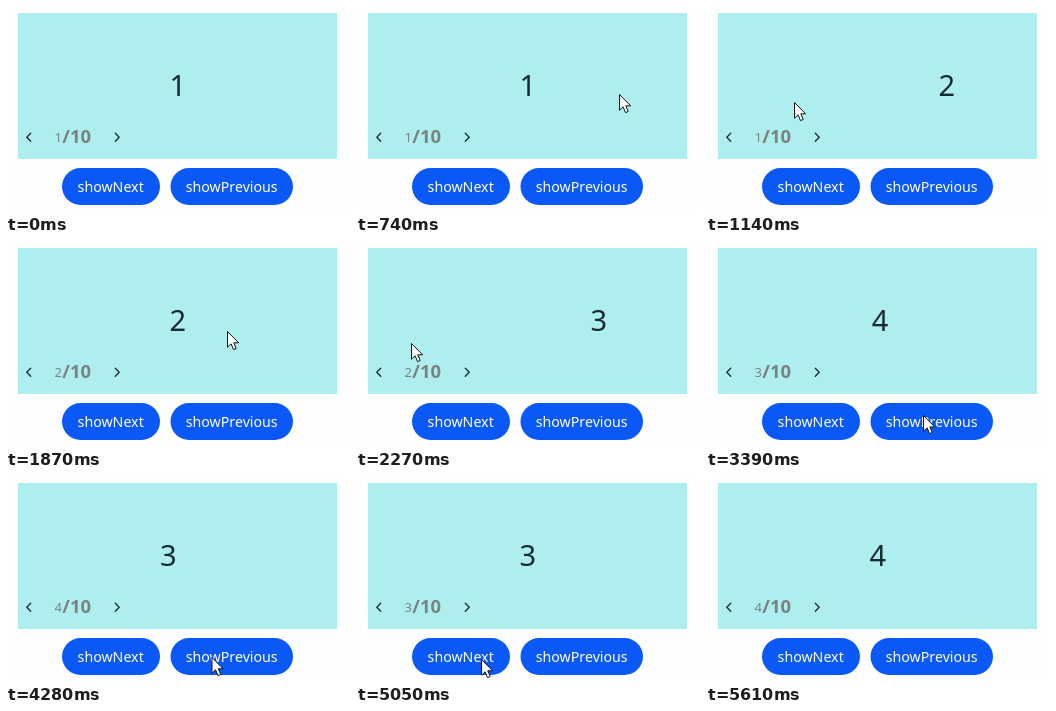
An HTML page for the animation above (6.11 s loop, 344 by 207 pixels).

```html
<!DOCTYPE html>
<html lang="en">
<head>
<meta charset="utf-8">
<title>Swiper</title>
<style>
  html, body { margin: 0; width: 100%; height: 100%; overflow: hidden; background: #fefefe; }
  svg { display: block; width: 100vw; height: 100vh; font-family: "Noto Sans", sans-serif; }
  .slide { font-size: 29px; fill: #182a30; text-anchor: middle; }
  .index { font-size: 13px; font-weight: 300; fill: #7a8585; text-anchor: middle; }
  .total { font-size: 18.5px; font-weight: 700; fill: #7b8282; }
  .arrow { fill: none; stroke: #182a30; stroke-width: 1.3; stroke-linecap: round; stroke-linejoin: round; }
  .button rect { fill: #0a59f7; }
  .button text { font-size: 14.2px; font-weight: 500; fill: #fff; text-anchor: middle; }
</style>
</head>
<body>
<svg viewBox="0 0 344 207">
  <defs><clipPath id="panel"><rect x="12" y="7" width="319" height="146"/></clipPath></defs>
  <rect x="12" y="7" width="319" height="146" fill="#afeeee"/>
  <g clip-path="url(#panel)">
    <text class="slide" id="left" y="90"></text>
    <text class="slide" id="right" y="90"></text>
  </g>
  <path class="arrow" d="M24.7 127.2L20.8 131.2L24.7 135.2M109.3 127.2L113.2 131.2L109.3 135.2"/>
  <text class="index" id="index" x="52.2" y="136"></text>
  <text class="total" x="56.3" y="137">/10</text>
  <g class="button">
    <rect x="56" y="162" width="98" height="37" rx="18.5"/>
    <text x="104.7" y="185.8">showNext</text>
  </g>
  <g class="button">
    <rect x="164.5" y="162" width="122.5" height="37" rx="18.5"/>
    <text x="225.7" y="185.8">showPrevious</text>
  </g>
  <path id="cursor" d="M.5 .5V16.2L4.1 12.8L6.5 18.6L9.2 17.5L6.8 11.8H11.6Z"
    fill="#fff" stroke="#111" stroke-width="1" stroke-linejoin="round"/>
</svg>
<script>
const LOOP = 6110, WIDTH = 319, CENTER = 171.7;
const DRAG = 260, PULL = 116, FLICK = 1000;

// at: spring start, mark: when the page counter follows
const moves = [
  { at: 1038, mark: 1460, from: 1, to: 2, drag: true },
  { at: 2170, mark: 2580, from: 2, to: 3, drag: true },
  { at: 3100, mark: 3540, from: 3, to: 4, drag: true },
  { at: 4017, mark: 4590, from: 4, to: 3 },
  { at: 5053, mark: 5600, from: 3, to: 4 }
];

const ease = {
  in: u => u * u,
  out: u => 1 - (1 - u) * (1 - u),
  both: u => u * u * (3 - 2 * u)
};

// time, x, y, easing towards this point
const path = [
  [250, 165, 140],
  [450, 263, 88, "out"],
  [778, 263, 88, "both"],
  [1038, 142, 94, "in"],
  [1130, 88, 96, "out"],
  [1320, 88, 96, "both"],
  [1530, 228, 89, "both"],
  [1620, 221, 90, "both"],
  [1910, 221, 90, "both"],
  [2170, 100, 99, "in"],
  [2260, 55, 102, "out"],
  [2340, 55, 102, "both"],
  [2590, 292, 90, "both"],
  [2840, 292, 90, "both"],
  [3100, 171, 98, "in"],
  [3180, 130, 102, "out"],
  [3390, 217, 174, "out"],
  [3610, 225, 183, "out"],
  [4160, 225, 183, "both"],
  [4280, 206, 181, "in"],
  [4600, 125, 183, "out"],
  [5050, 125, 183, "both"],
  [5270, 118, 210, "in"]
];

const el = id => document.getElementById(id);
const left = el("left"), right = el("right"), index = el("index"), cursor = el("cursor");

// Damped spring: stiffness 328, damping 34, mass 1
function spring(ms, dist, speed) {
  const s = ms / 1000, k = 17, w = Math.sqrt(328 - k * k);
  return Math.exp(-k * s) * (dist * Math.cos(w * s) + (k * dist - speed) / w * Math.sin(w * s));
}

function travel(m, t) {
  const s = t - m.at;
  if (s >= 0) {
    if (s > 520) return WIDTH;
    return WIDTH - (m.drag ? spring(s, WIDTH - PULL, FLICK) : spring(s, WIDTH, 0));
  }
  return m.drag && s > -DRAG ? PULL * ease.in(1 + s / DRAG) : 0;
}

function position(t) {
  let p = 1;
  for (const m of moves) p += (m.to - m.from) * travel(m, t) / WIDTH;
  return p;
}

function place(node, n, p) {
  node.textContent = n;
  node.setAttribute("x", CENTER + (n - p) * WIDTH);
}

function moveCursor(t) {
  const i = path.findIndex(k => k[0] > t);
  cursor.style.display = i > 0 ? "" : "none";
  if (i < 1) return;
  const a = path[i - 1], b = path[i];
  const u = ease[b[3]]((t - a[0]) / (b[0] - a[0]));
  cursor.setAttribute("transform", `translate(${a[1] + (b[1] - a[1]) * u} ${a[2] + (b[2] - a[2]) * u})`);
}

function draw(t) {
  const p = position(t), n = Math.floor(p + 1e-6);
  place(left, n, p);
  place(right, n + 1, p);
  index.textContent = moves.reduce((v, m) => t >= m.mark ? m.to : v, 1);
  moveCursor(t);
}

const start = performance.now();
function tick() {
  draw((performance.now() - start) % LOOP);
  requestAnimationFrame(tick);
}
draw(0);
requestAnimationFrame(tick);
</script>
</body>
</html>
```
